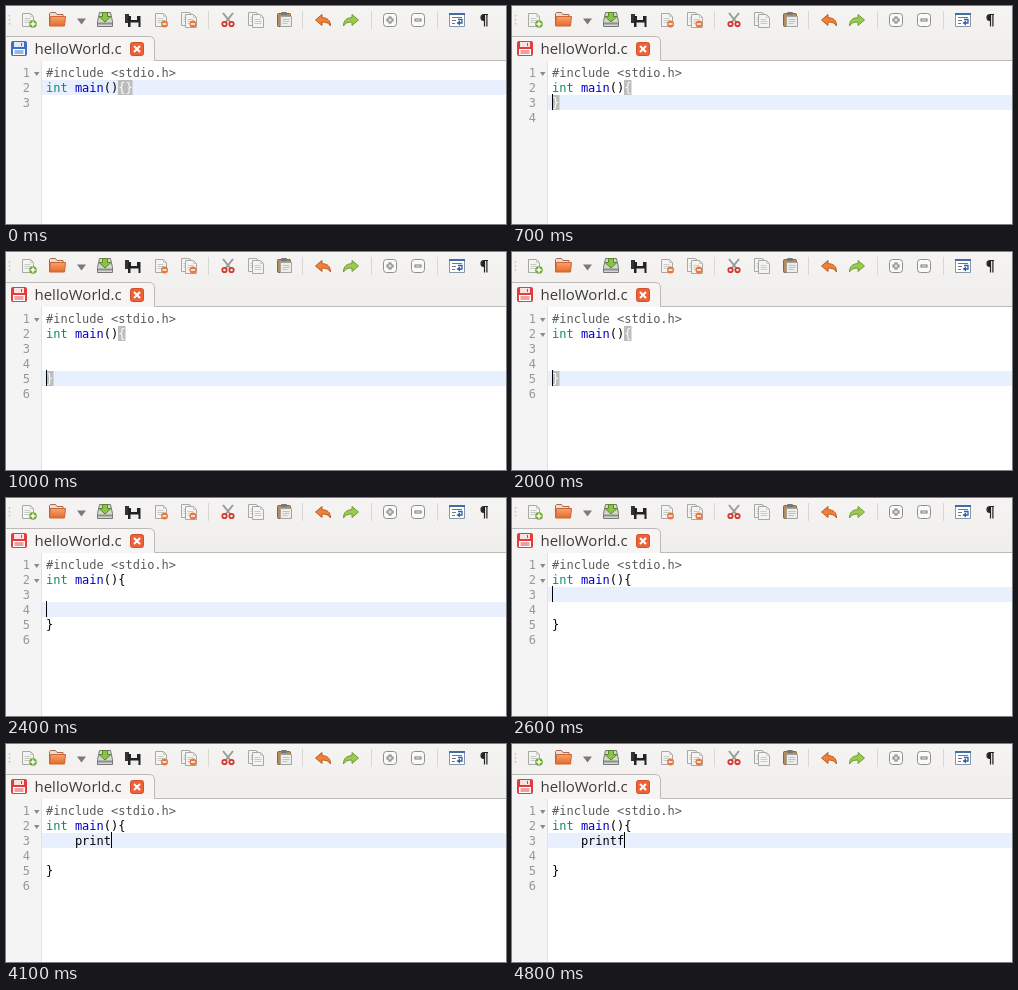
An HTML page that plays this animation: 500 px wide and 218 px high, repeating every 5100 ms.

```html
<!DOCTYPE html>
<html lang="en">
<head>
<meta charset="utf-8">
<title>Typing in a code editor</title>
<style>
html, body { margin: 0; width: 100%; height: 100%; overflow: hidden; background: #fff; }
svg { display: block; }
text { white-space: pre; }
.title { font: 15px "Open Sans", "Noto Sans", sans-serif; fill: #3c3c3c; }
.code { font: 12px "DejaVu Sans Mono", monospace; }
</style>
</head>
<body>
<svg width="500" height="218" viewBox="0 0 500 218">
  <defs>
    <linearGradient id="bar" x2="0" y2="1">
      <stop stop-color="#f5f4f2"/><stop offset="1" stop-color="#efeeec"/>
    </linearGradient>
    <linearGradient id="folder" x2="0" y2="1">
      <stop stop-color="#f6a46c"/><stop offset="1" stop-color="#e4692c"/>
    </linearGradient>
    <g id="page">
      <path d="M.5 .5h8l3 3v10h-11z" fill="#f4f4f2" stroke="#a8a8a4"/>
      <path d="M8.500 .5v3h3M2.500 5.500h6M2.500 7.500h7M2.500 9.500h7" fill="none" stroke="#c9c9c5"/>
    </g>
    <g id="minus">
      <circle r="3.500" fill="#e8783f"/>
      <path d="M-2 0h4" stroke="#fff" stroke-width="1.500"/>
    </g>
    <g id="box">
      <rect x=".5" y=".5" width="13" height="13" rx="3" fill="#fafaf9" stroke="#8f8f8c"/>
    </g>
    <path id="arrow" d="M0 6l6.500-5.500v3.200c5 0 8.500 2.300 8.500 8.300-1.800-3-4-4-8.500-4v3.500z"/>
  </defs>

  <rect width="500" height="55" fill="url(#bar)"/>
  <path d="M3.500 9v12" stroke="#c4c2be" stroke-width="1.500" stroke-dasharray="1.500 2.500"/>
  <path d="M202.500 5v18M296.500 5v18M365.500 5v18M431.500 5v18" stroke="#d9d7d4"/>

  <!-- new, open, save, save all -->
  <use href="#page" x="16" y="7"/>
  <circle cx="27" cy="18" r="3.800" fill="#6fae2c"/>
  <path d="M24.500 18h5M27 15.500v5" stroke="#fff" stroke-width="1.500"/>
  <path d="M43.500 19.500v-12l1-1h5l1.500 2h6v3" fill="#e4dfdb" stroke="#a8694c"/>
  <path d="M43.500 20l1-9.500h15l-1 9.500z" fill="url(#folder)" stroke="#cf6430"/>
  <path d="M71 12.500h9l-4.500 6z" fill="#7b7a77"/>
  <path d="M93.500 6.500h11l2 9v5h-15v-5z" fill="#d5d6d3" stroke="#777975"/>
  <path d="M92 17.500h14" stroke="#8d8f8b" stroke-width="2"/>
  <path d="M96.500 6.500h5v4h3.500l-6 5.500-6-5.500h3.500z" fill="#8bc34a" stroke="#578a20"/>
  <path d="M119 8h4v3h2v6h-6z" fill="#333"/>
  <path d="M122 10h12.500v11H122z" fill="#222"/>
  <path d="M125 10h6v4h-6zM124.500 16.500h8V21h-8z" fill="#eee"/>

  <!-- close, close all -->
  <use href="#page" x="149" y="7"/>
  <use href="#minus" x="158.500" y="18"/>
  <use href="#page" x="175" y="6"/>
  <use href="#page" x="179" y="8"/>
  <use href="#minus" x="187" y="18"/>

  <!-- cut, copy, paste -->
  <path d="M217 7l8 10M227 7l-8 10" stroke="#999b98" stroke-width="2"/>
  <g fill="none" stroke="#d2392f" stroke-width="1.800">
    <circle cx="218.500" cy="18" r="2.200"/><circle cx="225.500" cy="18" r="2.200"/>
  </g>
  <use href="#page" x="242" y="6"/>
  <use href="#page" x="246" y="8"/>
  <rect x="271.500" y="7.500" width="13" height="13" rx="1" fill="#b98b55" stroke="#8a6435"/>
  <rect x="275" y="6" width="6" height="3" rx="1" fill="#777"/>
  <path d="M274.500 10.500h11v10h-11z" fill="#ededeb" stroke="#a3a3a0"/>
  <path d="M276.500 13.500h7M276.500 15.500h7M276.500 17.500h5" stroke="#c2c2be"/>

  <!-- undo, redo, zoom -->
  <use href="#arrow" x="309.500" y="8" fill="#f0803c" stroke="#bf5a1c"/>
  <use href="#arrow" transform="translate(352.500 8) scale(-1 1)" fill="#9bcb4c" stroke="#6f9c34"/>
  <use href="#box" x="377" y="7"/>
  <path d="M380.500 14h7M384 10.500v7" stroke="#777" stroke-width="3"/>
  <path d="M381.500 14h5M384 11.500v5" stroke="#fff"/>
  <use href="#box" x="405" y="7"/>
  <path d="M408.500 14h7" stroke="#777" stroke-width="3"/>
  <path d="M409.500 14h5" stroke="#fff"/>

  <!-- word wrap, pilcrow -->
  <path d="M443.500 7.500h15v13h-15z" fill="#fff" stroke="#8796a8"/>
  <path d="M443 7h16v2h-16z" fill="#3f6ea8"/>
  <path d="M446 11.500h10M446 14.500h4M446 17.500h3" stroke="#777"/>
  <path d="M452 13.500h4v3.500h-3" fill="none" stroke="#2f62a5" stroke-width="1.300"/>
  <path d="M454 14.500v5l-3.500-2.500z" fill="#2f62a5"/>
  <path d="M482 8.500h-4a3 3 0 0 0 0 6h.5M478.500 8.500v12M480.900 8.500v12" fill="none" stroke="#222" stroke-width="1.200"/>
  <path d="M478.500 8.500a3 3 0 0 0 0 6z" fill="#222"/>

  <!-- tab -->
  <path d="M0 54.500h500" stroke="#bcbab7"/>
  <path d="M0 30.500h143q5.500 0 5.500 5.500v19H0z" fill="#f6f5f4"/>
  <path d="M0 30.500h143q5.500 0 5.500 5.500v18.500" fill="none" stroke="#bcbab7"/>
  <g id="disk" fill="currentColor">
    <rect x="5" y="35" width="16" height="15" rx="2"/>
    <path d="M8 36h10v5H8z" fill="#fff" fill-opacity=".85"/>
    <path d="M7 43h12v6H7z" fill="#fff"/>
    <path d="M8.500 45h9M8.500 47h9M15.500 37v3" stroke="currentColor"/>
  </g>
  <text class="title" x="28.500" y="48">helloWorld.c</text>
  <rect x="124.500" y="36.500" width="13" height="13" rx="2" fill="#ec6238" stroke="#d5502a"/>
  <path d="M128 40l6 6M134 40l-6 6" stroke="#fff" stroke-width="2"/>

  <!-- editor -->
  <rect y="55" width="36" height="163" fill="#f4f4f4"/>
  <path d="M35.500 55v163" stroke="#e2e2e2"/>
  <g id="editor" class="code"></g>
</svg>
<script>
const LOOP = 5100, LEFT = 40, CHAR = 7.224, LINE = 15;
// time, caret line, caret column, caret visible
const steps = [
  [0, 2, 11, 0], [200, 2, 11, 1],
  [700, 3, 0, 1], [900, 4, 0, 1], [1000, 5, 0, 1], [1500, 5, 0, 0], [2000, 5, 0, 1],
  [2400, 4, 0, 1], [2500, 3, 0, 1], [2700, 3, 4, 1], [3100, 3, 4, 0],
  [3500, 3, 5, 1], [3700, 3, 6, 1], [3800, 3, 7, 1], [4000, 3, 8, 1], [4100, 3, 9, 1],
  [4600, 3, 9, 0], [4800, 3, 10, 1]
];
const editor = document.getElementById("editor");
const disk = document.getElementById("disk");

const lineTop = n => 59 + LINE * (n - 1);
const colX = c => LEFT + CHAR * c;
const rect = (x, y, w, h, fill) =>
  `<rect x="${x}" y="${y}" width="${w}" height="${h}" fill="${fill}"/>`;
const put = (line, col, str, fill = "#000") =>
  `<text x="${colX(col)}" y="${lineTop(line) + 12}" fill="${fill}">${str}</text>`;
const fold = n => `<path d="M28 ${lineTop(n) + 7}h5.500l-2.750 4z" fill="#8a8a8a"/>`;
const brace = (line, col, str, lit) =>
  (lit ? rect(Math.floor(colX(col)), lineTop(line), 7.5, LINE, "#bdbdbd") : "") +
  put(line, col, str, lit ? "#fff" : "#000");

function view(t) {
  const [, line, col, caret] = steps.findLast(s => s[0] <= t);
  const end = t < 1000 ? line : 5; // line of the closing brace
  const lit = t < 2400;
  let out = rect(36, lineTop(line), 464, LINE, "#e8effd");
  for (let n = 1; n <= end + 1; n++)
    out += `<text x="24" y="${lineTop(n) + 12}" text-anchor="end" fill="#989898">${n}</text>`;
  out += fold(1) + (t >= 1400 ? fold(2) : "");
  out += put(1, 0, "#include &lt;stdio.h&gt;", "#5a5a5a");
  out += put(2, 0, "int", "#0a8a6c") + put(2, 4, "main", "#0000c8") + put(2, 8, "()");
  out += brace(2, 10, "{", lit) + brace(end, end === 2 ? 11 : 0, "}", lit);
  if (t >= 3500) out += put(3, 4, "printf".slice(0, col - 4));
  if (caret) out += rect(Math.floor(colX(col)), lineTop(line) - 1, 1, LINE + 1, "#000");
  return out;
}

let shown = "";
function draw(now) {
  const t = now % LOOP, next = view(t);
  if (next !== shown) {
    editor.innerHTML = shown = next;
    disk.setAttribute("color", t < 700 ? "#3a6fc4" : "#e23c3c");
  }
  requestAnimationFrame(draw);
}
draw(0);
</script>
</body>
</html>
```
